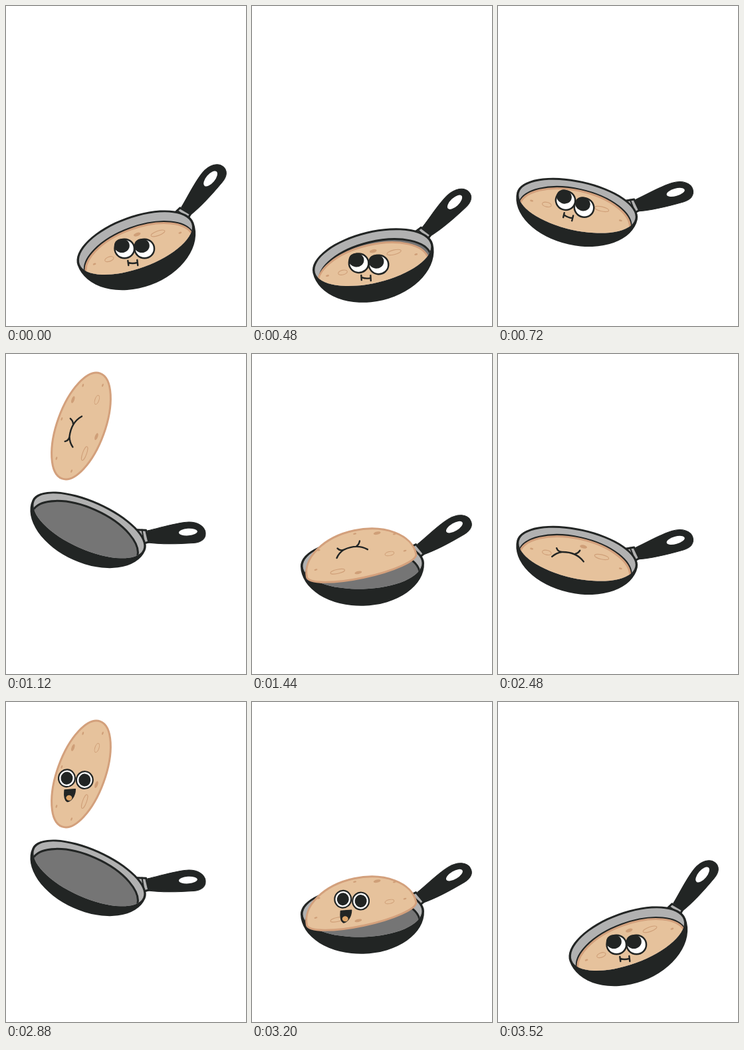
An HTML page with a canvas for the animation above (3.6 s loop, 361 by 480 pixels).

```html
<!DOCTYPE html>
<html lang="en">
<head>
<meta charset="utf-8">
<title>Pancake flip</title>
<style>
html, body { margin: 0; width: 100%; height: 100%; overflow: hidden; background: #fff; }
canvas { display: block; }
</style>
</head>
<body>
<canvas id="stage" width="361" height="480"></canvas>
<script>
const ctx = document.getElementById('stage').getContext('2d');
const BLACK = '#222524', WALL = '#b1b1b1', FLOOR = '#757575';
const DOUGH = '#e6c29c', CRUST = '#d3a07c', SPOT = '#cf9f78';
const STEP = 80, LOOP = 3600, FLIP_STEPS = 22;
const LEAVE = 10, TURN = 12, PEAK = 14, LAND = 19; // steps of the pancake's flight

// The pan's swing: rest, wind-up, dip, lift, top, catch, rest
const swing = [
  { t: 4, x: 195, y: 357, deg: -20 },
  { t: 5, x: 199.5, y: 352, deg: -20.5 },
  { t: 7, x: 160, y: 393, deg: -5 },
  { t: 9, x: 119, y: 300, deg: 12.5 },
  { t: 14, x: 124.5, y: 257, deg: 24 },
  { t: 18, x: 166, y: 316, deg: -1.5 },
  { t: 20, x: 195, y: 357, deg: -20 }
];

const clamp = v => Math.min(1, Math.max(0, v));

function slope(n, prop) {
  const a = swing[n - 1], b = swing[n + 1];
  return a && b ? (b[prop] - a[prop]) / (b.t - a.t) : 0;
}

// Smooth curve through the key poses
function swingAt(t, prop) {
  let n = 0;
  while (n < swing.length - 2 && swing[n + 1].t <= t) n++;
  const a = swing[n], b = swing[n + 1], span = b.t - a.t;
  const u = clamp((t - a.t) / span), v = 1 - u;
  return a[prop] * v * v * (1 + 2 * u) + b[prop] * u * u * (1 + 2 * v)
    + span * u * v * (slope(n, prop) * v - slope(n + 1, prop) * u);
}

// Thrown up to a peak, turning over on the way
function flightAt(i) {
  const d = i - PEAK, falling = d > 0;
  return {
    x: 113 + d * d * (falling ? 3 : .5),
    y: 108 + d * d * (falling ? 12 : 8),
    deg: 290 + d * (falling ? 14.5 : 21),
    half: 36 * Math.min(1, .3 + Math.abs(i - TURN + .5) * .3),
    bend: falling ? d * d * 1.1 : 0
  };
}

function at(x, y, deg, draw) {
  ctx.save();
  ctx.translate(x, y);
  ctx.rotate(deg * Math.PI / 180);
  draw();
  ctx.restore();
}

function paint(path, fill, stroke, width) {
  if (fill) { ctx.fillStyle = fill; ctx.fill(path); }
  if (stroke) { ctx.strokeStyle = stroke; ctx.lineWidth = width; ctx.stroke(path); }
}

// Two half ellipses that share the line at height y
function oval(x, y, a, top, bottom = top) {
  const p = new Path2D();
  p.ellipse(x, y, a, top, 0, Math.PI, 2 * Math.PI);
  p.ellipse(x, y, a, bottom, 0, 0, Math.PI);
  p.closePath();
  return p;
}

const rimTop = deg => 39.5 - deg * .12;
const opening = deg => oval(0, 0, 89.5, rimTop(deg) - 3, 36.5);

function drawHandle(deg) {
  at(88, -20.5, -29 + deg * .05, () => {
    paint(new Path2D('M-20-12L-2-10L1 8L-18 12Z'), WALL, BLACK, 3);
    paint(new Path2D('M-8-11L-6 9'), null, BLACK, 2);
    const grip = new Path2D('M0-9C20-12 42-18 60-18C76-18 87-10 87 0C87 9 80 14 68 14C40 14 20 13 0 9Z');
    paint(grip, BLACK, BLACK, 1);
    paint(oval(61, -3, 14, 6 - deg * .03), '#fff');
  });
}

function drawPan(deg) {
  drawHandle(deg);
  paint(oval(0, 0, 93, rimTop(deg), 61.5 - deg * .2), BLACK);
  paint(opening(deg), WALL);
  ctx.save();
  ctx.clip(opening(deg));
  paint(oval(0, 16, 86, 41), FLOOR, BLACK, 3);
  ctx.restore();
}

function drawBack() {
  paint(new Path2D('M-34-1Q-29-8-21-11Q0-16 14-4M-30-15Q-27-10-21-11M5-19Q3-14-1-12.5'), null, BLACK, 2.4);
}

// calm: 0 wide-eyed smile, 1 small mouth and eyes turned away
function drawFront(calm) {
  const mix = (a, b) => a + (b - a) * calm;
  for (const side of [-1, 1]) {
    const x = side * mix(13.5, 15);
    paint(oval(x, 0, mix(13.5, 16), mix(14, 15.5)), BLACK);
    paint(oval(x, 0, mix(11.3, 13.5), mix(11.8, 13)), '#fff');
    paint(oval(x - calm * 4, calm * -4.5, mix(9, 11.5), mix(9.5, 10.5)), BLACK);
  }
  if (calm) {
    paint(new Path2D('M-9 21Q-3 23 4 21M-10 18L-9 25M4 17L5 25'), null, BLACK, 2.4);
  } else {
    const mouth = new Path2D('M-15 18Q-6 16 1 15C2 26-4 34-9 35C-14 33-15 26-15 18Z');
    paint(mouth, BLACK, BLACK, 1.5);
    paint(oval(-7, 29, 4.5, 4), '#dda467');
  }
}

function drawSpots() {
  for (const side of [1, -1]) {
    paint(oval(4 + side * 41, 14 - side * 5, 9 - side * 2, 3), null, SPOT, 1);
    paint(oval(13 + side * 20, 1 - side * 26, 5.5, 2.2), SPOT);
  }
  for (let k = 0; k < 5; k++) {
    const turn = Math.PI * (.9 + k * .3);
    paint(oval(72 * Math.cos(turn), 31 * Math.sin(turn), 2.5, 1.2), SPOT);
  }
}

function drawCake(half, bend, a, drawFace) {
  const shape = oval(0, bend, a, half + bend, half - bend);
  paint(shape, DOUGH, CRUST, 3);
  ctx.save();
  ctx.clip(shape);
  ctx.save();
  ctx.scale(1, half / 36);
  drawSpots();
  ctx.restore();
  drawFace();
  ctx.restore();
}

function render(step) {
  const second = step >= FLIP_STEPS, i = second ? step - FLIP_STEPS : step;
  const turned = i >= TURN, front = turned === second;
  const calm = turned ? clamp((i - LAND - 1) / 2) : 1;
  const deg = swingAt(i, 'deg');
  const flying = i >= LEAVE && i < LAND;

  ctx.clearRect(0, 0, 361, 480);
  ctx.lineCap = ctx.lineJoin = 'round';
  at(swingAt(i, 'x'), swingAt(i, 'y'), deg, () => {
    drawPan(deg);
    if (flying) return;
    const slip = i === 5 || i === 6 ? 4 : 0;
    ctx.clip(opening(deg));
    at(-slip, 18 + slip / 2, 180, () => drawCake(41, 0, 85, () => {
      if (front) at(4, 17 + deg * .25, 193 - deg * .35, () => drawFront(calm));
      else at(2, 5, 180, drawBack);
    }));
  });

  if (flying) {
    const cake = flightAt(i);
    at(cake.x, cake.y, cake.deg, () => drawCake(cake.half, cake.bend, 84, () => {
      if (!front) at(0, 0, turned ? 0 : 180, drawBack);
      else if (turned) at(-10, -5, 6 - cake.deg, () => drawFront(0));
      else at(4, 10, 192, () => drawFront(1));
    }));
  }
}

function tick(now) {
  render(Math.floor(now % LOOP / STEP));
  requestAnimationFrame(tick);
}
render(0);
requestAnimationFrame(tick);
</script>
</body>
</html>
```
